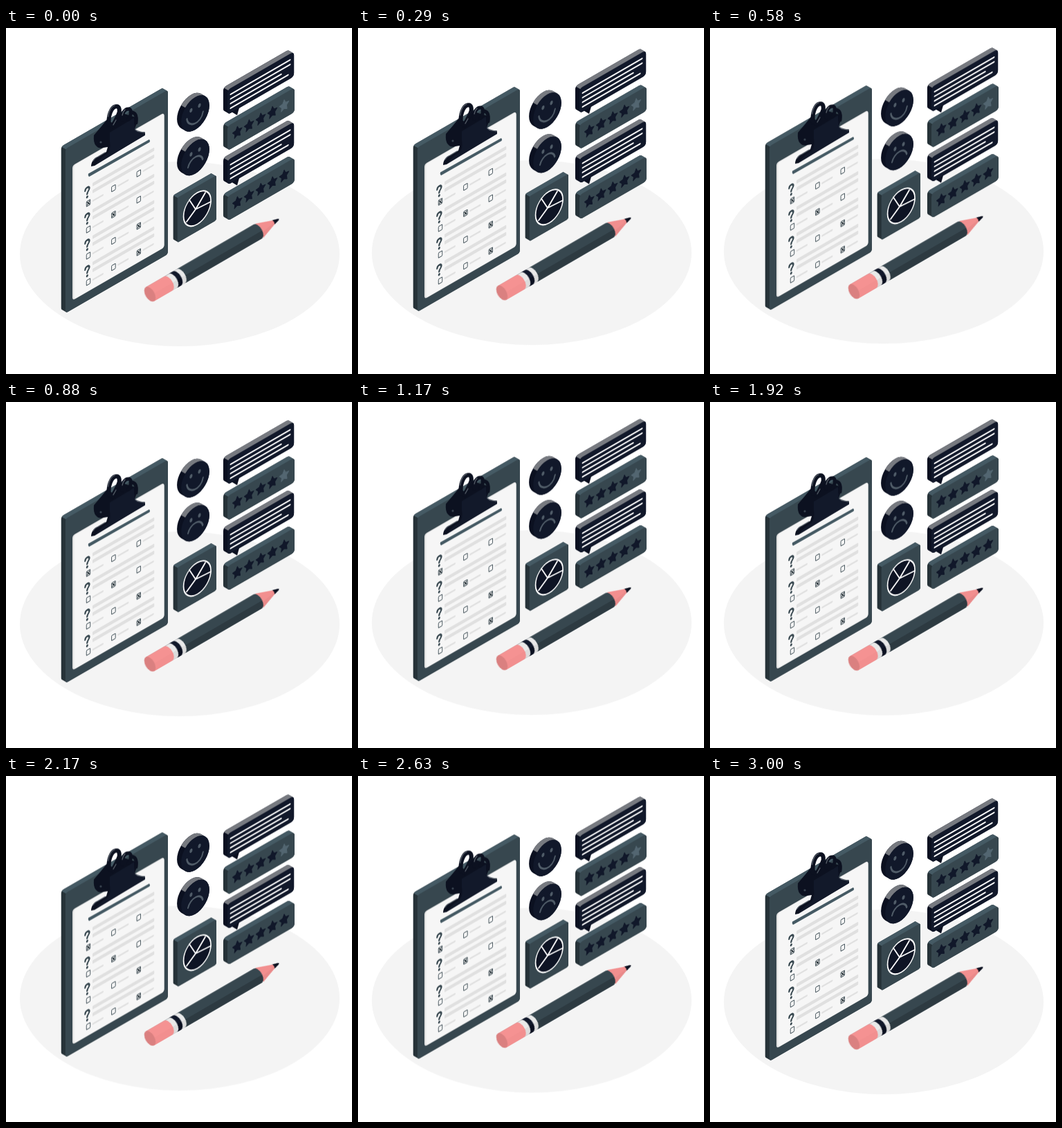
An HTML page that plays this animation: 500x500 px, repeating every 3040 ms.

```html
<!DOCTYPE html>
<html lang="en">
<head>
<meta charset="utf-8">
<title>Survey</title>
<style>
  html, body { margin: 0; width: 100%; height: 100%; overflow: hidden; background: #fff; }
  svg { display: block; width: 100vw; height: 100vh; }
  /* the faces float inside the floating scene, so they travel twice as far */
  #scene, #faces { animation: float 3040ms linear infinite; }
  @keyframes float {
    0%, 98.684%, 100% { transform: translateY(0); }
    49.342% { transform: translateY(-10px); }
  }
  .line { fill: none; stroke-linecap: round; stroke-linejoin: round; }
</style>
</head>
<body>
<svg viewBox="0 0 500 500">
  <g id="scene">
    <ellipse cx="251" cy="326.5" rx="231" ry="133.5" fill="#f4f4f4"/>
    <g id="board"></g>
    <g id="clip">
      <path fill="#0c1120" d="M127 155L138 142L146 132L153 137L166 122L174 125L187 129L188 140L186 146L190 150L200 150Q202 152 200 155L164 177L128 199L123 200Q123 193 129 188L145 179L147 172L140 173Q134 175 130 170Q126 166 127 155Z"/>
      <path fill="#12192a" d="M150 151L185 130L186 146Q188 151 201 152L201 155L130 197Q134 189 146 182Q152 177 150 164Z"/>
      <path class="line" stroke="#0c1120" stroke-width="6" d="M149 140C147 128 152 115 158 113.500C164 112 165.500 119 162 126L154 142"/>
      <path class="line" stroke="#0c1120" stroke-width="5" d="M168 133C167 123 172 116 178 117C182 119 181 126 177 132M180 122Q190 121 188 137"/>
      <path class="line" stroke="#59616b" stroke-width="1.3" d="M147.500 128C149 119 152 113.500 157 112M155 140L159 133M126 192Q128 188 133 186L143 180M187 147Q190 150 200 151M168 126Q169 121 172 118"/>
      <circle cx="137" cy="165" r="1.600" fill="#3b4652"/>
    </g>
    <g id="faces"></g>
    <g id="cards"></g>
    <g id="pencil" transform="translate(208 384.700) rotate(-30.200)">
      <path fill="#f28f8f" d="M183 -11.500L209 -2.300V2.300L183 11.700Z"/>
      <path fill="#e98a8a" d="M187 4L209 .5V2.300L183 11.700Z"/>
      <path fill="#0c1120" d="M206.500 -3.400L214.500 -1.200Q217 0 214.500 1.200L206.500 3.400Q208.500 0 206.500 -3.400Z"/>
    </g>
  </g>
</svg>
<script>
  const $ = id => document.getElementById(id);
  const add = (id, html) => $(id).insertAdjacentHTML('beforeend', html);
  // right-facing isometric plane with its origin at x, y
  const iso = (x, y, html) => `<g transform="matrix(.866 -.5 0 1 ${x} ${y})">${html}</g>`;
  const line = (d, color, width) => `<path class="line" d="${d}" stroke="${color}" stroke-width="${width}"/>`;

  const navy = { front: '#11182a', side: '#0b1020', top: '#777a80' };
  const slate = { front: '#37474f', side: '#263238', top: '#455a64' };
  const depth = 7;

  // rounded plate with its thickness to the upper left
  function slab(w, h, c, r) {
    const d = depth, k = r * Math.SQRT1_2, arc = `A${r} ${r} 0 0 1`;
    return `<path d="M${r - d} ${r - d}H${w - r - d}L${w - r} ${r}V${h - r}H${r}L${r - d} ${h - r - d}Z"
        fill="${c.side}" stroke="${c.side}" stroke-width="${2 * r}" stroke-linejoin="round"/>
      <path d="M${r - d - k} ${r - d - k}${arc} ${r - d} ${-d}H${w - r - d}${arc} ${w - r - d + k} ${r - d - k}
        L${w - r + k} ${r - k}L${w - r} ${r}H${r}L${r - k} ${r - k}Z" fill="${c.top}"/>
      <rect width="${w}" height="${h}" rx="${r}" fill="${c.front}"/>`;
  }

  // clipboard and sheet
  add('board', iso(85.8, 174.8, slab(171, 237.5, slate, 4)) +
    iso(96, 198.8, '<rect width="153" height="195" rx="4" fill="#e0e0e0"/><rect x="2.500" y="1" width="150.500" height="193.500" rx="3.500" fill="#f6f6f6"/>') +
    '<path d="M119 210.500L207 161Q209 163 207.500 165L120 215Q118 213 119 210.500Z" fill="#455a64"/>');

  const checked = [0, 1, 2, 2];
  checked.forEach((mark, row) => {
    const y = 38 * row;
    let html = iso(117.3, 237.3 + y,
      line('M-3.300 -3.500C-3.300 -7.800 3.600 -7.800 3.600 -3.800C3.600 -.8 0 -.8 0 2.600', '#37474f', 2.8) +
      '<circle cy="6.800" r="1.800" fill="#37474f"/>');
    for (const top of [226.5, 236.5])
      html += iso(125, top + y, '<rect y="-2.500" width="103" height="5" rx="1" fill="#e0e0e0"/>');
    for (let i = 0; i < 3; i++) {
      html += iso(119 + 36.4 * i, 253 + y - 21.5 * i,
        '<rect x="-3.200" y="-3.700" width="6.400" height="7.400" rx="1" fill="#f6f6f6" stroke="#37474f"/>' +
        (i === mark ? line('M-1.800 -2L1.800 2M1.800 -2L-1.800 2', '#263238', 1.4) : '') +
        line('M8 .5H24', '#e0e0e0', 2.6));
    }
    add('board', html);
  });

  // faces
  function face(y, mouth) {
    const eye = x => `<ellipse cx="${x}" cy="-8" rx="2.400" ry="2.900"/>`;
    return iso(273.5, y,
      line(`M0 0L${-depth} ${-depth}`, navy.side, 47) +
      `<path d="M9.600 -23.600A23.500 23.500 0 0 0 -23.600 -23.600L-16.600 -16.600A23.500 23.500 0 0 1 16.600 -16.600Z" fill="${navy.top}"/>
       <circle r="23.500" fill="${navy.front}"/>
       <g fill="#505c68">${eye(-7)}${eye(7)}</g>` +
      line(mouth, '#505c68', 2.6));
  }
  add('faces', face(123.5, 'M-14 1C-12 16 10 20 13 4') + face(187, 'M-12 8.500A12.500 11.500 0 0 1 12.500 9'));

  // pie chart
  add('cards', iso(247.7, 245.3, slab(65, 65, slate, 2.5)) +
    iso(276.3, 260.8, '<circle r="22.800" fill="#0e1424" stroke="#fff" stroke-width="1.900"/>') +
    line('M274 262L265 248.500M274 262L288 238M274 262L296 251M274 262L261 280', '#fff', 1.8));

  // speech bubbles and ratings
  const star = Array.from({ length: 10 }, (_, i) => {
    const r = i % 2 ? 4.2 : 8.2, a = Math.PI * (i / 5 - .5);
    return `${r * Math.cos(a)},${r * Math.sin(a)}`;
  }).join(' ');

  function bubble(y) {
    const ends = [99.3, 99.3, 84.5, 96];
    return `<path d="M324 ${y + 30.5}L334 ${y + 36.5}L338 ${y + 22.5}Z" fill="${navy.side}"/>` +
      iso(320, y, slab(111, 36, navy, 5)) +
      ends.map((w, i) => iso(324.5, y + 6.3 + 6.7 * i, line(`M0 0H${w}`, '#fff', 2.2))).join('');
  }

  function rating(y, score) {
    let html = iso(320, y, slab(112, 35.5, slate, 5));
    for (let i = 0; i < 5; i++) {
      const c = i < score ? '#11182a' : '#536671';
      html += iso(334.3 + 16.9 * i, y + 8.5 - 9.6 * i,
        `<polygon points="${star}" fill="${c}" stroke="${c}" stroke-width="1.200" stroke-linejoin="round"/>`);
    }
    return html;
  }
  [[0, 4], [101.5, 5]].forEach(([dy, score]) =>
    add('cards', rating(142 + dy, score) + bubble(89.5 + dy)));

  // pencil sections, far end first: length, upper and lower tone
  const tube = (len, top, low) => {
    const end = 'A6.600 11.700 0 0 1';
    return `<path d="M0 -11.700H${len}${end} ${len} 11.700H0Z" fill="${top}"/>
      <path d="M0 2H${len + 6.4}${end} ${len} 11.700H0Z" fill="${low}"/>`;
  };
  add('pencil', tube(180, '#37474f', '#2d3a41') + tube(51.5, '#e9e9e9', '#dcdcdc') +
    tube(45, '#11182a', '#0b1020') + tube(38, '#e9e9e9', '#dcdcdc') + tube(30.5, '#f59292', '#f28f8f') +
    '<ellipse rx="6.600" ry="11.700" fill="#da8080"/>');
</script>
</body>
</html>
```
